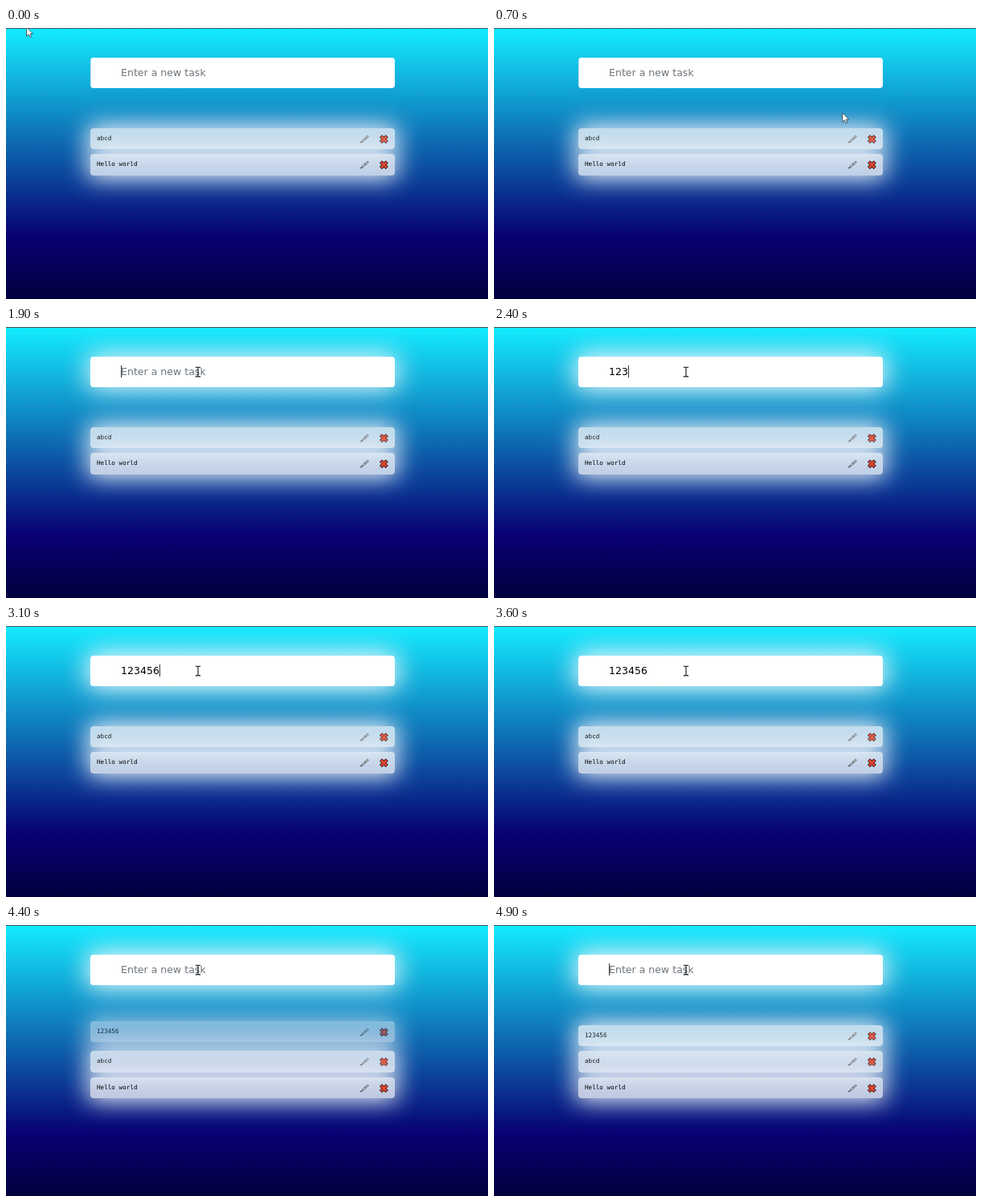
Write an HTML page that moves like this. It is 600 by 338 pixels and loops after 5000 ms.

```html
<!DOCTYPE html>
<html lang="en">
<head>
<meta charset="utf-8">
<title>Task list</title>
<style>
  html, body { margin: 0; width: 100%; height: 100%; overflow: hidden; }
  #stage {
    position: relative; width: 600px; height: 338px; overflow: hidden;
    background: linear-gradient(#14ecff, #080074 77%, #01003c);
  }
  #stage::before {
    content: ""; position: absolute; width: 100%; height: 1.3px; background: #45525c;
  }
  #field, .item { position: absolute; left: 105px; width: 379px; border-radius: 4px; }
  #field {
    top: 36.7px; height: 38px; background: #fff;
    font: 12.55px/38px "DejaVu Sans", Verdana, sans-serif;
  }
  #field::before {
    content: ""; position: absolute; left: 0; top: 3px; bottom: 3px;
    border-left: 1px dotted #a9cfe0; opacity: var(--idle);
  }
  #text { position: absolute; left: 38px; white-space: pre; }
  #caret { position: absolute; top: 11.5px; width: 1px; height: 15px; background: #333; }
  .item {
    height: 26.4px; background: rgba(255, 255, 255, .74);
    box-shadow: 0 0 30px 3px #fff; color: #000;
    font: 7.63px/26.4px "DejaVu Sans Mono", Consolas, monospace;
  }
  .item span { position: absolute; left: 8px; white-space: pre; }
  .item svg { position: absolute; left: 334px; top: 7px; }
  #mouse { position: absolute; left: 0; top: 0; z-index: 2; overflow: visible; }
</style>
</head>
<body>
<div id="stage">
  <div id="field"><span id="text"></span><i id="caret"></i></div>
  <svg id="mouse" width="1" height="1">
    <path id="arrow" d="M0 0V11.2L2.6 8.8L4.4 12.6L6.2 11.8L4.5 8.1H7.9Z" fill="#fff" stroke="#222" stroke-width=".7"/>
    <path id="beam" d="M-3.2-5.7H-.8L0-5L.8-5.7H3.2M0-5V5.2M-3.2 5.9H-.8L0 5.2L.8 5.9H3.2" fill="none" stroke="#111" stroke-width="1.1"/>
  </svg>
</div>
<script>
const $ = id => document.getElementById(id);
const LOOP = 5000, STEP = 100;
const CLICK = 1700, TYPE = 2000, KEY = 200, ENTER = 4000, DROP = 800;
const TASK = "123456", TOP = 124.6, GAP = 32.7;

const icons = `<svg width="40" height="13">
  <path d="M2.6 11L4 8.8L9.7 3.3Q11.4 2 12 2.8T10.8 5L5 9.9Z" fill="#cfd5da" stroke="#4a5058" stroke-width=".8"/>
  <path d="M2.2 11.3L4.2 9.2M7.6 5.2L9.2 6.4" stroke="#333" stroke-width=".9"/>
  <g fill="none"><path d="M27.5 2.8L35.3 10.6M35.3 2.8L27.5 10.6" stroke="#3a1714" stroke-width="4.4"/>
  <path d="M28 3.3L34.8 10.1M34.8 3.3L28 10.1" stroke="#e2472f" stroke-width="2.7"/></g>
</svg>`;

const items = [TASK, "abcd", "Hello world"].map(label => {
  const item = document.createElement("div");
  item.className = "item";
  item.innerHTML = `<span>${label}</span>${icons}`;
  $("stage").insertBefore(item, $("mouse"));
  return item;
});

const clamp = v => Math.max(0, Math.min(1, v));
const smooth = v => v * v * (3 - 2 * v);
const easeOut = v => 1 - (1 - v) ** 1.5;
const progress = (t, start, length) => clamp((t - start) / length);
const mix = (a, b, p) => a + (b - a) * p;

function drawMouse(t) {
  const a = smooth(progress(t, 0, 700)), b = smooth(progress(t, 700, 600));
  const x = mix(mix(25.5, 433.8, a), 239, b);
  const y = mix(mix(-1, 106, a), 56, b);
  const overField = t > 700 && y < 74;
  $("mouse").style.transform = `translate(${x}px, ${y}px)`;
  $("arrow").style.display = overField ? "none" : "";
  $("beam").style.display = overField ? "" : "none";
}

function drawField(t) {
  const focus = smooth(progress(t, CLICK - 50, 300));
  const count = t < ENTER ? Math.floor((t - TYPE) / KEY) + 1 : 0;
  const typed = TASK.slice(0, Math.max(0, count));
  $("field").style.boxShadow = `0 0 32px 3px rgba(255,255,255,${focus})`;
  $("field").style.setProperty("--idle", 1 - focus);
  $("text").textContent = typed || "Enter a new task";
  $("text").style.color = typed ? "#000" : "#6c757d";
  $("caret").style.left = 38 + (typed ? $("text").offsetWidth : 0) + "px";
  $("caret").style.display = t >= CLICK && (t < 3500 || t >= 4500) ? "" : "none";
}

function drawItems(t) {
  const added = t >= ENTER, p = easeOut(progress(t, ENTER, DROP));
  items.forEach((item, i) => item.style.top = TOP + GAP * (added ? i : i - 1) + "px");
  const style = items[0].style;
  style.display = added ? "" : "none";
  style.opacity = p;
  style.zIndex = p < 1 ? 1 : "auto";
  style.transform = p < 1 ? `translateY(${-14 * (1 - p)}px)` : "none";
  style.filter = p < 1 ? `brightness(${clamp(p * 1.6)})` : "none";
}

function draw(now) {
  const t = Math.floor(now % LOOP / STEP) * STEP;
  drawMouse(t);
  drawField(t);
  drawItems(t);
  requestAnimationFrame(draw);
}

const start = performance.now();
draw(0);
function draw0(now) { draw(now); }
</script>
</body>
</html>
```
